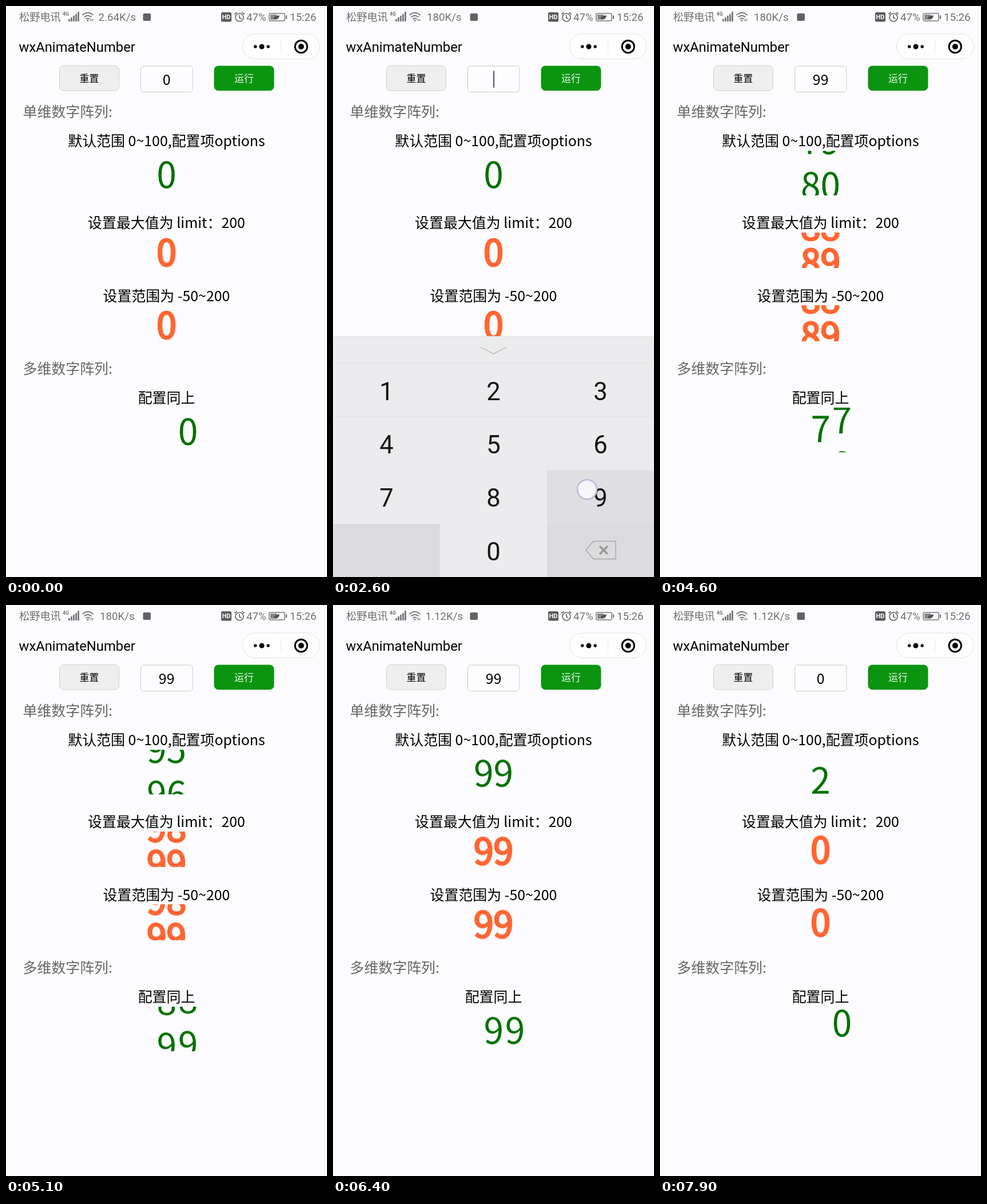
Recreate the animation shown at these times as an HTML page. Size 561 by 998 pixels, loop 8 s.

```html
<!DOCTYPE html>
<html lang="zh-CN">
<head>
<meta charset="utf-8">
<title>wxAnimateNumber</title>
<style>
  html, body { margin: 0; width: 100%; height: 100%; overflow: hidden; background: #fcfcfe; }
  body { position: relative; font-family: "Noto Sans CJK SC", "Noto Sans CJK", sans-serif; }
  svg { position: absolute; left: 0; top: 0; display: block; }
  text { font-size: 24.93px; }
  .mid { text-anchor: middle; }
  .roboto { font-family: Roboto, sans-serif; }
  .status text { font-size: 18.7px; fill: #707072; }
  .section { fill: #666; }
  .button { font-size: 16.9px; }
  .keys text { font-size: 43.6px; fill: #161616; }

  /* Rolling numbers */
  .window { position: absolute; overflow: hidden; height: var(--cell); line-height: var(--cell);
    font-size: 62.33px; text-align: center; white-space: pre; color: #007000; --cell: 77.92px; }
  .bold { color: #f63; -webkit-text-stroke: 3px #f63; --cell: 62.33px; }
  .reel { --run: calc(var(--cell) * var(--steps)); animation: slow 8s infinite; }
  .bold .reel { animation-name: fast; }
  .reel div { height: var(--cell); }

  /* The return trip is cut by the loop end, so its curve is the first part of (0,1,0,1). */
  @keyframes slow {
    0% { transform: none; }
    55.4875% { transform: none; animation-timing-function: cubic-bezier(0, 1, 0, 1); }
    82.6875% { transform: translateY(calc(var(--run) * -1)); }
    87.3125% { transform: translateY(calc(var(--run) * -1)); animation-timing-function: cubic-bezier(0, .7706, 0, .9556); }
    100% { transform: translateY(calc(var(--run) * -.0138)); }
  }
  @keyframes fast {
    0% { transform: none; }
    55.4875% { transform: none; animation-timing-function: cubic-bezier(0, 1, 0, 1); }
    69.0875% { transform: translateY(calc(var(--run) * -1)); }
    87.3125% { transform: translateY(calc(var(--run) * -1)); animation-timing-function: cubic-bezier(0, .9576, 0, .9982); }
    100% { transform: translateY(calc(var(--run) * -.0001)); }
  }

  .keyboard { animation: keyboard 8s ease-out infinite; }
  @keyframes keyboard {
    0%, 3.3% { transform: translateY(421px); }
    6.2%, 42% { transform: none; }
    46.2%, 100% { transform: translateY(421px); }
  }

  /* Hard switches */
  .switch { animation: 8s step-end infinite; }
  @keyframes zero { 0% { opacity: 1; } 18.7% { opacity: 0; } 86.2% { opacity: 1; } }
  @keyframes nine { 0% { opacity: 0; } 33.7% { opacity: 1; } 36.2% { opacity: 0; } }
  @keyframes ninetyNine { 0% { opacity: 0; } 36.2% { opacity: 1; } 86.2% { opacity: 0; } }
  @keyframes speedA { 0% { opacity: 1; } 27.4% { opacity: 0; } }
  @keyframes speedB { 0% { opacity: 0; } 27.4% { opacity: 1; } 64.9% { opacity: 0; } }
  @keyframes speedC { 0% { opacity: 0; } 64.9% { opacity: 1; } }
  @keyframes caret {
    0% { opacity: 0; transform: translateX(289px); }
    12.4% { opacity: 1; transform: translateX(289px); }
    18.7% { opacity: 1; transform: translateX(281px); }
    26.2% { opacity: 0; transform: translateX(281px); }
    31.2% { opacity: 1; transform: translateX(281px); }
    33.7% { opacity: 1; transform: translateX(289px); }
    36.2% { opacity: 1; transform: translateX(296px); }
    41.2% { opacity: 0; transform: translateX(296px); }
  }
  @keyframes touch {
    0% { opacity: 0; transform: translate(281px, 130px); }
    2.4% { opacity: 1; transform: translate(281px, 130px); }
    4.9% { opacity: 0; transform: translate(470px, 950px); }
    16.2% { opacity: 1; transform: translate(470px, 950px); }
    19.9% { opacity: 0; transform: translate(444px, 845px); }
    31.2% { opacity: 1; transform: translate(444px, 845px); }
    33.7% { opacity: 0; transform: translate(448px, 838px); }
    34.9% { opacity: 1; transform: translate(448px, 838px); }
    37.4% { opacity: .5; transform: translate(448px, 838px); }
    38.7% { opacity: 0; transform: translate(440px, 128px); }
    52.4% { opacity: 1; transform: translate(440px, 128px); }
    54.9% { opacity: 0; transform: translate(150px, 128px); }
    84.9% { opacity: 1; transform: translate(150px, 128px); }
    87.4% { opacity: 0; transform: translate(150px, 128px); }
  }
  @keyframes pressDelete { 0% { opacity: 0; } 16.2% { opacity: 1; } 19.9% { opacity: 0; } }
  @keyframes pressNine { 0% { opacity: 0; } 31.2% { opacity: 1; } 33.7% { opacity: 0; } 34.9% { opacity: 1; } 36.2% { opacity: 0; } }
  @keyframes pressRun { 0% { opacity: 0; } 52.4% { opacity: 1; } 54.9% { opacity: 0; } }
  @keyframes pressReset { 0% { opacity: 0; } 84.9% { opacity: 1; } 87.4% { opacity: 0; } }
</style>
</head>
<body>
<svg width="561" height="998">
  <g class="status roboto">
    <text x="23" y="26.3" style="font: 18.2px 'Noto Sans CJK SC', sans-serif">松野电讯</text>
    <text x="99" y="17" style="font-size: 8.5px; font-weight: 700">4G</text>
    <path d="M110.5 27v-4M114.5 27v-7M118.5 27v-10M122.5 27v-13M126.5 27v-17" stroke="#6c6c6e" stroke-width="2.6"/>
    <g fill="none" stroke="#77777a" stroke-width="1.8">
      <path d="M133.5 16q9.5-8.500 19 0M136.500 19.500q6.500-5.500 13 0M139.500 23q3.500-3 7 0"/>
      <path d="M148.500 22.500v4M151.500 22.500v4" stroke-width="1.4"/>
    </g>
    <circle cx="143" cy="25.500" r="1.600" fill="#77777a"/>
    <g class="mid">
      <text class="switch" x="194.300" y="26" style="animation-name: speedA">2.64K/s</text>
      <text class="switch" x="194.300" y="26" style="animation-name: speedB">180K/s</text>
      <text class="switch" x="194.300" y="26" style="animation-name: speedC">1.12K/s</text>
    </g>
    <rect x="239.500" y="13" width="13.500" height="13" rx="2" fill="#626265"/>
    <rect x="376" y="11" width="18" height="16.500" rx="2.500" fill="#59595c"/>
    <text class="mid" x="385" y="23.300" style="font-size: 11px; font-weight: 700; fill: #fff">HD</text>
    <g fill="none" stroke="#68686b" stroke-width="1.700">
      <circle cx="408" cy="20" r="7"/>
      <path d="M408 15.500v5l3.500 2M399.500 14.500l4-3.500M416.500 14.500l-4-3.500"/>
    </g>
    <text x="420" y="26">47%</text>
    <rect x="460" y="13" width="27" height="13" rx="2" fill="none" stroke="#77777a" stroke-width="1.500"/>
    <rect x="462" y="15" width="11" height="9" fill="#88888a"/>
    <path d="M468 23q0-7 10-6.500q-1 8-8 6z" fill="#505053"/>
    <path d="M490 16.500v6" stroke="#68686b" stroke-width="2"/>
    <text x="496" y="26">15:26</text>
  </g>

  <text class="roboto" x="22.500" y="80" style="font-size: 23.8px">wxAnimateNumber</text>
  <rect x="413.500" y="49" width="134.500" height="43.500" rx="21.750" fill="#fefeff" stroke="#e2e2dc"/>
  <path d="M480.500 58v25" stroke="#ecebea"/>
  <circle cx="447" cy="71" r="4.500"/>
  <circle cx="435.800" cy="71" r="2.700"/>
  <circle cx="458.200" cy="71" r="2.700"/>
  <circle cx="515.800" cy="71" r="10.700" fill="none" stroke="#000" stroke-width="3"/>
  <circle cx="515.800" cy="71" r="5"/>

  <rect x="93.500" y="104.500" width="104" height="43.500" rx="7.500" fill="#efeff0" stroke="#cfcfcb"/>
  <rect class="switch" x="93.500" y="104.500" width="104" height="43.500" rx="7.500" fill="#dedee0" stroke="#c6c6c4" style="animation-name: pressReset"/>
  <text class="button mid" x="145.500" y="133">重置</text>
  <rect x="235.500" y="105" width="90.500" height="45.500" rx="5" fill="#fdfdff" stroke="#cbcbc9"/>
  <rect x="363.500" y="104.500" width="105" height="43.500" rx="7.500" fill="#0b9410"/>
  <rect class="switch" x="363.500" y="104.500" width="105" height="43.500" rx="7.500" fill="#087a0c" style="animation-name: pressRun"/>
  <text class="button mid" x="416" y="133" fill="#effaef">运行</text>
  <g class="mid">
    <text class="switch" x="280.700" y="137.500" style="animation-name: zero">0</text>
    <text class="switch" x="280.700" y="137.500" style="animation-name: nine">9</text>
    <text class="switch" x="280.700" y="137.500" style="animation-name: ninetyNine">99</text>
  </g>
  <rect class="switch" x="-1" y="113.500" width="2" height="29" fill="#505050" style="animation-name: caret"/>

  <text class="section" x="29.500" y="194">单维数字阵列:</text>
  <text class="section" x="29.500" y="643">多维数字阵列:</text>
  <g class="mid">
    <text x="280.500" y="245">默认范围 0~100,配置项options</text>
    <text x="280.500" y="388">设置最大值为 limit：200</text>
    <text x="280.500" y="515.500">设置范围为 -50~200</text>
    <text x="280.500" y="694">配置同上</text>
  </g>
</svg>

<div id="numbers"></div>

<svg width="561" height="998">
  <g class="keyboard">
    <rect y="577" width="561" height="421" fill="#ecebed"/>
    <path d="M0 905h186.500v93H0zM374 905h187v93H374z" fill="#dcdbde"/>
    <rect class="switch" x="374" y="811" width="187" height="94" fill="#dfdee1" style="animation-name: pressNine"/>
    <rect class="switch" x="374" y="905" width="187" height="93" fill="#cfced2" style="animation-name: pressDelete"/>
    <path d="M0 577.500h561M0 624.500h561M0 717.500h561" stroke="#e2e1e2"/>
    <path d="M258 596.500l22.500 11.500l22-11.500" fill="none" stroke="#b4b4ae" stroke-width="1.300"/>
    <g id="keys" class="keys roboto mid"></g>
    <path d="M442 951l13-15.500h39v31h-39z" fill="none" stroke="#a5a5a5" stroke-width="1.300"/>
    <path d="M466 944l14 14m0-14l-14 14" stroke="#999" stroke-width="3.500"/>
  </g>
  <circle class="switch" r="17" fill="#fafaff" fill-opacity=".85" stroke="#bbbbdc" stroke-width="2.500" style="animation-name: touch"/>
</svg>

<script>
  const range = n => Array.from({ length: n }, (_, i) => i);

  function addReel(left, top, width, labels, bold) {
    const box = document.createElement('div');
    box.className = bold ? 'window bold' : 'window';
    box.style.cssText = `left:${left}px;top:${top}px;width:${width}px`;
    const cells = labels.map(label => `<div>${label}</div>`).join('');
    box.innerHTML = `<div class="reel" style="--steps:${labels.length - 1}">${cells}</div>`;
    document.getElementById('numbers').append(box);
  }

  addReel(180.5, 253, 200, range(100));
  addReel(180.5, 396, 200, range(100), true);
  addReel(180.5, 523.3, 200, range(100), true);
  addReel(262, 702, 37.4, ['', ...range(10)]); // the leading digit rests on a blank
  addReel(299.4, 702, 37.4, range(10));

  document.getElementById('keys').innerHTML = range(10).map(digit => {
    const slot = digit ? digit - 1 : 10;
    const x = 93.5 + 187 * (slot % 3);
    const y = 688.7 + 93.3 * Math.floor(slot / 3);
    return `<text x="${x}" y="${y}">${digit}</text>`;
  }).join('');
</script>
</body>
</html>
```
